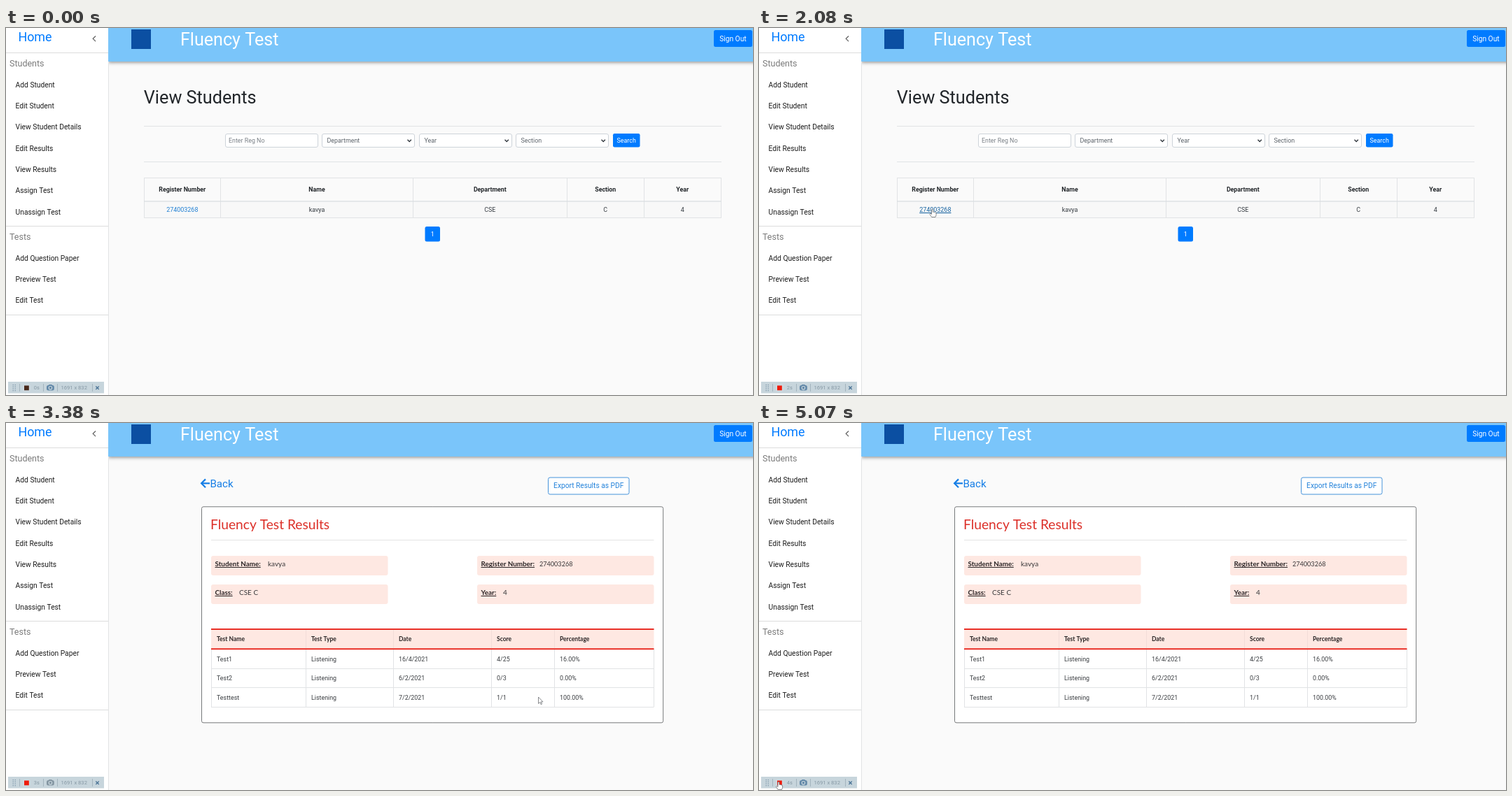
Write an HTML page with a canvas that moves like this. It is 1067x525 px and loops after 5200 ms.

```html
<!DOCTYPE html>
<html lang="en">
<head>
<meta charset="utf-8">
<title>Student results</title>
<style>
html, body { margin: 0; width: 100%; height: 100%; overflow: hidden; background: #fafafa; }
canvas { display: block; width: 1067px; height: 525px; }
</style>
</head>
<body>
<canvas id="stage"></canvas>
<script>
const W = 1067, H = 525, LOOP = 5200, STEP = 130;
const BLUE = '#007bff', INK = '#212529', LINE = '#e1e3e5', RED = '#e8251c', PINK = '#fee8e2';
const SANS = 'Roboto, Arial, sans-serif', ROUND = 'Lato, "Open Sans", sans-serif';
const canvas = document.getElementById('stage');
const ctx = canvas.getContext('2d');
const dpr = window.devicePixelRatio || 1;
canvas.width = W * dpr;
canvas.height = H * dpr;

const student = { name: 'kavya', id: '274003268' };

// y is the middle of the capitals
function text(str, x, y, size, color = INK, o = {}) {
  ctx.font = `${o.weight || 400} ${size}px ${o.font || SANS}`;
  ctx.textAlign = o.align || 'left';
  ctx.fillStyle = color;
  const base = y + size * 0.355;
  ctx.fillText(str, x, base);
  if (o.under) {
    const w = ctx.measureText(str).width;
    const left = o.align === 'center' ? x - w / 2 : x;
    rect(left, Math.round(base + 1), w, 1, color);
  }
}

function rect(x, y, w, h, fill) {
  ctx.fillStyle = fill;
  ctx.fillRect(x, y, w, h);
}

function box(x, y, w, h, r, fill, stroke) {
  ctx.beginPath();
  ctx.roundRect(x, y, w, h, r);
  if (fill) { ctx.fillStyle = fill; ctx.fill(); }
  if (stroke) { ctx.strokeStyle = stroke; ctx.lineWidth = 1; ctx.stroke(); }
}

function path(points, color, width) {
  ctx.beginPath();
  points.forEach(([x, y]) => ctx.lineTo(x, y));
  ctx.strokeStyle = color;
  ctx.lineWidth = width;
  ctx.stroke();
}

const hline = (x, y, w, c = LINE) => rect(x, y, w, 1, c);
const vline = (x, y, h, c = LINE) => rect(x, y, 1, h, c);

function menu(title, y, items) {
  text(title, 5, y, 12.5, '#7b7b7b');
  items.forEach((item, i) => text(item, 13.6, y + 30.3 * (i + 1), 10.25, '#1c1c1c'));
}

function sidebar() {
  rect(0, 0, 146, H, '#fff');
  vline(146, 48, H, '#e2e3e4');
  text('Home', 17.4, 12.6, 17.9, BLUE);
  path([[128, 11.5], [124.2, 15.3], [128, 19.1]], '#666', 1.3);
  [35, 283, 410].forEach(y => hline(0, y, 146, '#dcdddd'));
  menu('Students', 50.8, ['Add Student', 'Edit Student', 'View Student Details',
    'Edit Results', 'View Results', 'Assign Test', 'Unassign Test']);
  menu('Tests', 298.8, ['Add Question Paper', 'Preview Test', 'Edit Test']);
}

function header() {
  ctx.save();
  ctx.shadowColor = 'rgba(0,0,0,.42)';
  ctx.shadowBlur = 5 * dpr;
  ctx.shadowOffsetY = 1.5 * dpr;
  rect(146, -10, W, 58, '#7ac5fa');
  ctx.restore();
  rect(179, 2, 28, 28, '#0b4fa2');
  text('Fluency Test', 249, 15.6, 25.1, '#fff');
  box(1011, 3, 55, 24, 2.5, BLUE);
  text('Sign Out', 1038.4, 15.2, 10.2, '#fff', { align: 'center' });
}

function field(x, label, select) {
  box(x + 0.5, 151.5, 132, 19, 2.5, '#fff', '#ced4da');
  text(label, x + (select ? 7.5 : 5), 161.2, 8.9, select ? '#5c636a' : '#7a8087');
  if (select) path([[x + 122.5, 159.8], [x + 125.2, 162.5], [x + 127.9, 159.8]], '#343a40', 1.4);
}

function listPage(hover) {
  text('View Students', 196.8, 98.6, 25.24);
  hline(197, 140, 825);
  hline(197, 191, 825);
  field(313, 'Enter Reg No', false);
  field(451, 'Department', true);
  field(590, 'Year', true);
  field(728, 'Section', true);
  box(867, 151, 38.5, 19.5, 2.2, BLUE);
  text('Search', 886.2, 161.2, 8.9, '#fff', { align: 'center' });

  rect(197, 249, 825, 22, '#f8f8f8');
  [197, 306, 581, 801, 911, 1021].forEach(x => vline(x, 214, 58));
  hline(197, 214, 825);
  rect(197, 247.3, 825, 1.3, '#dadee2');
  hline(197, 271, 825);
  const cols = [
    ['Register Number', student.id, 251.8], ['Name', student.name, 444],
    ['Department', 'CSE', 691.3], ['Section', 'C', 856.2], ['Year', '4', 966.2]
  ];
  cols.forEach(([head, value, x], i) => {
    text(head, x, 231.2, 8.8, INK, { weight: 700, align: 'center' });
    const color = i ? '#343a40' : hover ? '#12609f' : '#1f7fd3';
    text(value, x, 259.4, 8.95, color, { align: 'center', under: !i && hover });
  });
  box(598.5, 284, 21.5, 21.5, 2.5, BLUE);
  text('1', 609.2, 295, 9, '#fff', { align: 'center' });
}

function info(x, y, label, value, vx, size = 10) {
  box(x, y, 252.5, 28, 3, PINK);
  text(label, x + 5.5, y + 11.4, 9.85, '#2a2526', { font: ROUND, weight: 700, under: true });
  if (value) text(value, vx, y + 11.4, size, '#38383a', { font: ROUND });
}

function resultsPage(loaded) {
  const link = '#157ee6';
  path([[291, 86.3], [279.5, 86.3]], link, 2.2);
  path([[285, 80.4], [279.1, 86.3], [285, 92.2]], link, 2.2);
  text('Back', 291.4, 87, 15.14, link);
  box(774.5, 78, 115.5, 24, 2.5, '#fff', '#4593da');
  text('Export Results as PDF', 832.2, 89.6, 10.2, '#2181da', { align: 'center' });

  box(279.5, 119.8, 659.2, loaded ? 309 : 226, 2.5, '#fff', '#77797b');
  text('Fluency Test Results', 292, 145.6, 19.2, '#dc3029', { font: ROUND });
  hline(293, 167, 632.5, '#e4e4e4');

  const val = v => loaded ? v : '';
  info(293, 190, 'Student Name:', val(student.name), 374);
  info(673, 190, 'Register Number:', val(student.id), 762, 9.1);
  info(293, 231, 'Class:', val('CSE C'), 333);
  info(673, 231, 'Year:', val('4'), 710);

  const cols = loaded ? [293, 428, 553, 693, 783] : [293, 442, 579, 670, 769];
  const heads = ['Test Name', 'Test Type', 'Date', 'Score', 'Percentage'];
  rect(293, 294, 632.5, 30, PINK);
  cols.forEach((x, i) => {
    if (i) vline(x, 296, 26, '#f3dcd8');
    text(heads[i], x + 8, 309.2, 8.5, '#2a2526', { font: ROUND, weight: 700 });
  });
  if (loaded) {
    const rows = [
      ['Test1', 'Listening', '16/4/2021', '4/25', '16.00%'],
      ['Test2', 'Listening', '6/2/2021', '0/3', '0.00%'],
      ['Testtest', 'Listening', '7/2/2021', '1/1', '100.00%']
    ];
    rows.forEach((row, r) => {
      row.forEach((cell, i) => text(cell, cols[i] + 8, 337.6 + 27.5 * r, 8.9, '#3a3d41'));
      hline(293, Math.floor(351 + 27.5 * r), 632.5);
    });
    [...cols, 925].forEach(x => vline(x, 324, 82));
  }
  rect(293, 294, 632.5, 1.9, RED);
  rect(293, 322.3, 632.5, 1.9, RED);
}

function recorder(t) {
  const bar = '#c7d5dc', grey = '#8799a5', blue = '#6389a9';
  rect(3, 506, 137, 16.5, bar);
  for (let i = 0; i < 8; i++) rect(9.6 + 3 * (i % 2), 510 + 2.7 * (i >> 1), 1.2, 1.2, '#7590a4');
  [19, 53, 73, 123].forEach(x => vline(x, 509, 11, '#a3b4be'));
  rect(24, 510, 10.5, 10, '#ced9df');
  rect(26, 511.5, 6.8, 6.8, t < 1040 ? '#48291b' : t < 2080 ? '#1d100c' : '#ee1b0c');
  text(Math.floor(t / 1040) + 's', 39.8, 514.8, 7.4, grey);
  const cam = t >= 3380 && t < 4160 ? '#8496a2' : blue;
  box(58, 511, 10.8, 7.6, 2.5, cam);
  rect(61.2, 510, 4.4, 1.5, cam);
  ctx.beginPath();
  ctx.arc(63.4, 514.8, 2.3, 0, 7);
  ctx.strokeStyle = bar;
  ctx.lineWidth = 1.1;
  ctx.stroke();
  text('1691 x 832', 78.5, 514.8, 7.6, grey);
  path([[128.3, 512.6], [132.7, 517]], '#4e7698', 1.4);
  path([[132.7, 512.6], [128.3, 517]], '#4e7698', 1.4);
}

// pointer hot spot: time, x, y
const track = [
  [390, 66, 478], [650, 170, 385], [910, 243, 290], [1170, 247.5, 259], [2340, 247.5, 259],
  [2600, 560, 420], [2730, 640, 442], [2860, 640, 442], [2990, 652, 432.5],
  [3380, 760.5, 392], [4160, 760.5, 392], [4290, 600, 418], [4550, 80, 503],
  [4680, 48, 509], [4810, 42, 511], [5070, 28, 513]
];

function pointerAt(t) {
  let i = 0;
  while (i < track.length - 1 && track[i + 1][0] <= t) i++;
  const a = track[i], b = track[i + 1] || a;
  const k = b === a ? 0 : (t - a[0]) / (b[0] - a[0]);
  return [a[1] + (b[1] - a[1]) * k, a[2] + (b[2] - a[2]) * k];
}

const ARROW = new Path2D('M0 0V9.4L2.2 7.4L3.7 10.7L5.1 10L3.6 6.9H6.5Z');
const HAND = new Path2D('M-1 .9Q0-.5 1 .9V4.4Q2.2 3.7 2.7 4.7Q3.8 4.1 4.2 5.1Q5.5 4.7 5.6 6V8.6L4.5 11.5H-.8L-3.6 7.5Q-3.2 6-1.9 6.7L-1 7.5Z');

function pointer(x, y, hand) {
  ctx.save();
  ctx.translate(x, y);
  const shape = hand ? HAND : ARROW;
  ctx.fillStyle = '#fff';
  ctx.fill(shape);
  ctx.strokeStyle = '#6b6e71';
  ctx.lineWidth = 0.8;
  ctx.lineJoin = 'round';
  ctx.stroke(shape);
  ctx.restore();
}

function draw(now) {
  const t = Math.floor((now % LOOP) / STEP) * STEP;
  ctx.setTransform(dpr, 0, 0, dpr, 0, 0);
  rect(0, 0, W, H, '#fafafa');
  const hover = t >= 1170 && t < 2340;
  if (t < 2340) listPage(hover);
  else resultsPage(t >= 2470);
  header();
  sidebar();
  recorder(t);
  if (t >= 390) {
    const [x, y] = pointerAt(t);
    pointer(x, y, hover || t === 2340 || t >= 4940);
  }
}

const start = performance.now();
function tick() {
  draw(performance.now() - start);
  requestAnimationFrame(tick);
}
tick();
</script>
</body>
</html>
```
